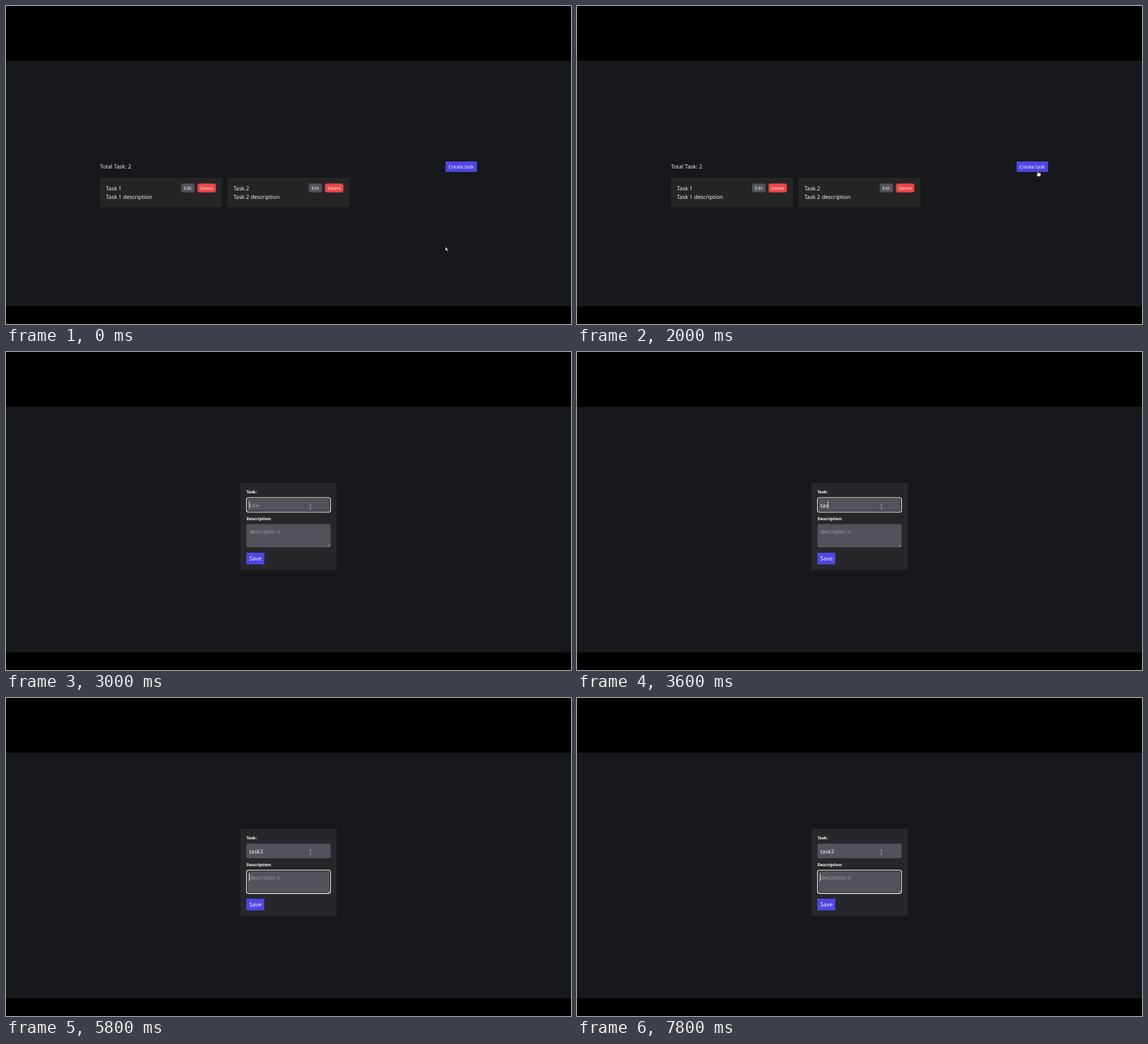
An HTML page with a canvas for the animation above (8 s loop, 800 by 450 pixels).

```html
<!DOCTYPE html>
<html lang="en">
<head>
<meta charset="utf-8">
<title>Task list</title>
<style>
  html, body { margin: 0; width: 100%; height: 100%; overflow: hidden; background: #000; }
  canvas { display: block; width: 800px; height: 450px; }
</style>
</head>
<body>
<canvas id="stage"></canvas>
<script>
const LOOP = 8000, STEP = 200;
const canvas = document.getElementById('stage');
const dpr = window.devicePixelRatio || 1;
canvas.width = 800 * dpr;
canvas.height = 450 * dpr;
const ctx = canvas.getContext('2d');

const color = {
  page: '#17181b', card: '#262526', form: '#26272a', field: '#52525b',
  indigo: '#4f46e5', red: '#ef4444', text: '#fff', hint: '#a0a0a8'
};

// Pointer changes: time, shape, x, y (hot spot)
const pointerTrack = [
  [0, 'arrow', 622, 340.5],
  [600, 'arrow', 352, 302],
  [800, 'arrow', 138, 266],
  [1000, 'arrow', 433.5, 281.7],
  [1200, 'hand', 654, 223.5],
  [1600, 'hand', 655, 227],
  [1800, 'hand', 654, 230],
  [2000, 'hand', 652.5, 232.7],
  [2200, 'arrow', 270, 232.5],
  [2400, 'arrow', 372, 240],
  [2600, 'beam', 424, 251],
  [2800, 'beam', 431, 218.5]
];

// Typing in the title field: time, text, caret shown
const typingTrack = [
  [0, '', false], [3000, '', true], [3200, 't', true], [3400, 'ta', true],
  [3600, 'tas', true], [4200, 'tas', false], [4400, 'task', true],
  [4600, 'task3', true], [4800, 'task3', false]
];

const FORM_OPENS = 2200, TITLE_FOCUS = 3000, DESC_FOCUS = 4800;
const BLINK = 530, BLINK_START = 4620;

const latest = (track, t) => track.filter(k => k[0] <= t).pop();

function box(x, y, w, h, fill, r = 0) {
  ctx.fillStyle = fill;
  ctx.beginPath();
  ctx.roundRect(x, y, w, h, r);
  ctx.fill();
}

function label(str, x, y, size, fill = color.text, weight = 400) {
  ctx.font = `${weight} ${size}px "Open Sans", "Noto Sans", sans-serif`;
  ctx.textRendering = 'geometricPrecision';
  ctx.fillStyle = fill;
  ctx.fillText(str, x, y);
  return x + ctx.measureText(str).width;
}

function outline(x, y, w, h, stroke, width, r) {
  ctx.strokeStyle = stroke;
  ctx.lineWidth = width;
  ctx.beginPath();
  ctx.roundRect(x, y, w, h, r);
  ctx.stroke();
}

function field(x, y, w, h, focused) {
  box(x, y, w, h, color.field, 3);
  if (!focused) return;
  outline(x, y, w, h, '#141416', 2.6, 3);
  outline(x, y, w, h, '#f4f4f5', 1.05, 3);
}

function caret(x, y) {
  box(x, y, 0.7, 10.5, '#fff');
}

function card(n, x) {
  box(x, 243, 172.7, 41.4, color.card);
  label(`Task ${n}`, x + 8.4, 260.8, 7.85);
  label(`Task ${n} description`, x + 8.4, 273.2, 7.85);
  box(x + 115, 251.2, 19, 12.6, color.field, 3);
  label('Edit', x + 119, 259.9, 6.1);
  box(x + 138.2, 251.2, 26, 12.6, color.red, 3);
  label('Delete', x + 142, 259.9, 6.1);
}

function drawList() {
  label('Total Task: 2', 133, 229.5, 7.85);
  box(622.4, 220, 44.4, 14.8, color.indigo);
  label('Create task', 626.6, 230.3, 6.87);
  card(1, 133);
  card(2, 313.5);
}

function drawForm(t) {
  const [, title, titleCaret] = latest(typingTrack, t);
  box(332, 185, 136, 123.5, color.form);

  label('Task:', 340.4, 200, 5.9, color.text, 700);
  field(340.4, 206, 119.2, 20.8, t >= TITLE_FOCUS && t < DESC_FOCUS);
  const end = title ? label(title, 344.5, 219.6, 7.9) : 344.4;
  if (!title) label('title', 344.5, 219.6, 7.9, color.hint);
  if (titleCaret) caret(end, 211);

  label('Description:', 340.4, 237.5, 5.9, color.text, 700);
  field(340.4, 243.4, 119.2, 33.2, t >= DESC_FOCUS);
  label('descriptio n', 344.5, 257.1, 7.9, color.hint);
  if (t >= DESC_FOCUS && Math.floor((t - BLINK_START) / BLINK) % 2 === 0) caret(344.3, 248.6);

  ctx.strokeStyle = '#c8c8cc';
  ctx.lineWidth = 0.6;
  ctx.beginPath();
  ctx.moveTo(455.6, 275.6); ctx.lineTo(458.8, 272.4);
  ctx.moveTo(457.4, 275.6); ctx.lineTo(458.8, 274.2);
  ctx.stroke();

  box(340.4, 284, 25.3, 16.5, color.indigo);
  label('Save', 344.6, 295.4, 8);
}

const pointers = {
  arrow() {
    const p = new Path2D('M0 0V6.4L1.5 5.1L2.5 7.5L3.7 7L2.7 4.7H4.6Z');
    ctx.strokeStyle = '#000';
    ctx.lineWidth = 0.7;
    ctx.fillStyle = '#fff';
    ctx.fill(p);
    ctx.stroke(p);
  },
  hand() {
    const p = new Path2D('M-.7 .5Q0 -.4 .7 .5V3L4 3.8Q4.6 4 4.5 5L3.8 8.6H-.4L-2.6 5.4Q-2.4 4.5 -1.5 5L-.7 5.8Z');
    ctx.strokeStyle = '#000';
    ctx.lineWidth = 0.7;
    ctx.lineJoin = 'round';
    ctx.fillStyle = '#fff';
    ctx.fill(p);
    ctx.stroke(p);
  },
  beam() {
    ctx.strokeStyle = '#a6a6ac';
    ctx.lineWidth = 0.7;
    ctx.stroke(new Path2D('M-1.4 -3.4H1.4M0 -3.4V3.4M-1.4 3.4H1.4'));
  }
};

function drawPointer(t) {
  const [, shape, x, y] = latest(pointerTrack, t);
  ctx.save();
  ctx.translate(x, y);
  pointers[shape]();
  ctx.restore();
}

function draw(now) {
  const t = Math.floor((now % LOOP) / STEP) * STEP;
  ctx.setTransform(dpr, 0, 0, dpr, 0, 0);
  box(0, 0, 800, 450, '#000');
  box(0, 77.6, 800, 347.4, color.page);
  if (t < FORM_OPENS) drawList();
  else drawForm(t);
  drawPointer(t);
}

const start = performance.now();
function tick() {
  draw(performance.now() - start);
  requestAnimationFrame(tick);
}
tick();
</script>
</body>
</html>
```
